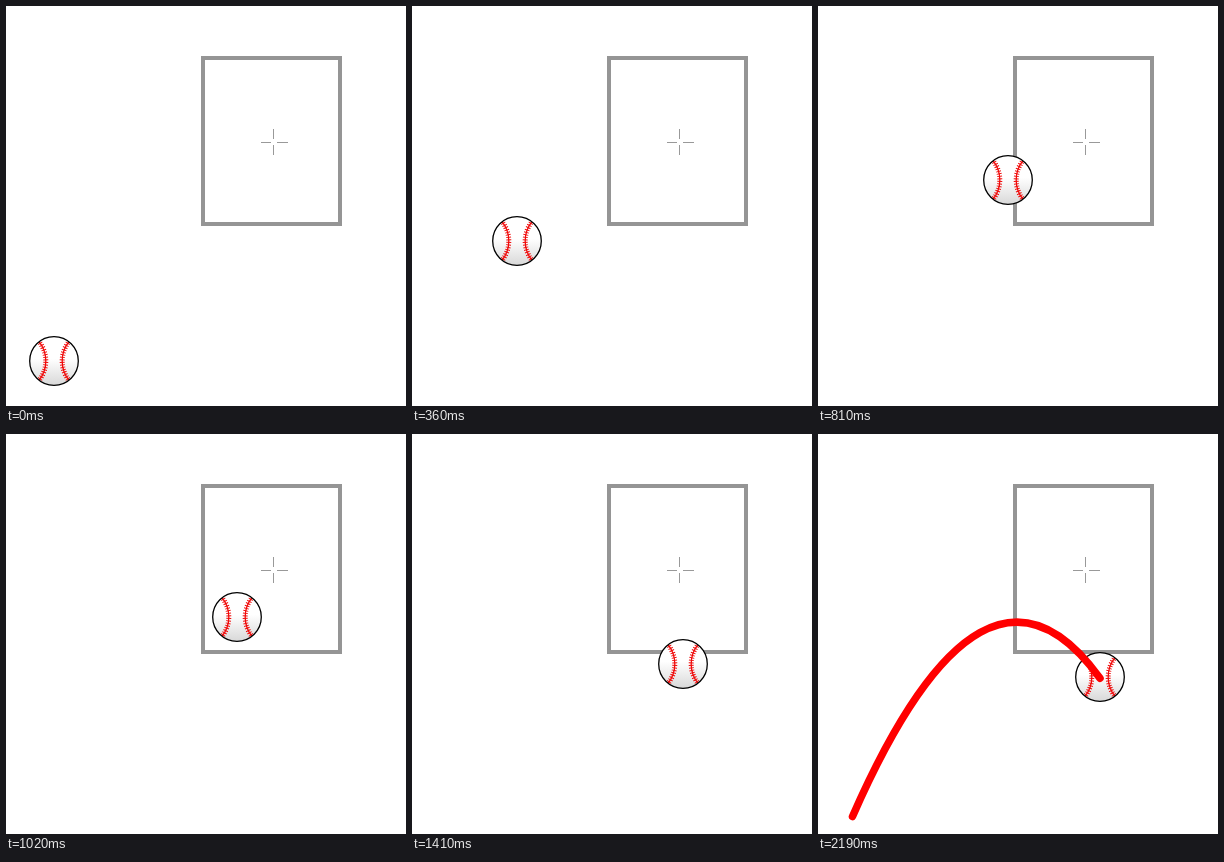
An HTML page for the animation above (2.82 s loop, 400 by 400 pixels).

```html
<!DOCTYPE html>
<html lang="en">
<head>
<meta charset="utf-8">
<title>Curveball</title>
<style>
  html, body { margin: 0; width: 100%; height: 100%; overflow: hidden; background: #fff; }
  svg { display: block; width: 100%; height: 100%; }
  .seam { fill: none; stroke: #f00a0a; }
  .line { stroke-width: 1.3; }
  .stitches { stroke-width: 5; stroke-dasharray: 1 1.5; }
  #trail { fill: none; stroke: #f00; stroke-width: 7.5; stroke-linecap: round; animation: reveal 2820ms step-end infinite; }
</style>
</head>
<body>
<svg viewBox="0 0 400 400">
  <defs>
    <linearGradient id="shade" x1="0" y1="0" x2="0" y2="1">
      <stop offset=".45" stop-color="#fff"/>
      <stop offset="1" stop-color="#d8d8d8"/>
    </linearGradient>
    <clipPath id="inside"><circle r="24"/></clipPath>
    <g id="seam" class="seam">
      <path class="line" d="M-15.5-20A31 31 0 0 1-15.5 20"/>
      <path class="stitches" d="M-15.5-20A31 31 0 0 1-15.5 20"/>
    </g>
  </defs>
  <rect x="197" y="52" width="137" height="166" fill="none" stroke="#959595" stroke-width="4"/>
  <path d="M267.5 123v10M267.5 139v10M255 136.500h10M271 136.500h11" stroke="#999"/>
  <g id="ball" transform="translate(48 355)">
    <circle r="24.300" fill="url(#shade)"/>
    <g clip-path="url(#inside)">
      <use href="#seam"/>
      <use href="#seam" transform="scale(-1 1)"/>
    </g>
    <circle r="24.300" fill="none" stroke="#000" stroke-width="1.300"/>
  </g>
  <path id="trail" d="M34.500 382.500Q165.800 83.800 282 244.300" visibility="hidden"/>
</svg>
<script>
const LOOP = 2820, STEP = 30, TRAIL_AT = 2190;
const ball = document.getElementById('ball');
const trail = document.getElementById('trail');

// Flight waypoints: step, x, y
const points = [
  [0, 48, 355], [12, 105, 235], [18, 138, 199], [19, 144, 195], [27, 190, 174],
  [30, 208, 170], [36, 241, 192], [42, 258, 214], [52, 282, 243]
];
const last = points.length - 1;

const slope = (i, axis) =>
  (points[i + 1][axis] - points[i][axis]) / (points[i + 1][0] - points[i][0]);

function tangent(i, axis) {
  if (i === 0) return 2 * slope(0, axis) - tangent(1, axis);
  if (i === last) return 2 * slope(last - 1, axis) - tangent(last - 1, axis);
  const before = points[i][0] - points[i - 1][0];
  const after = points[i + 1][0] - points[i][0];
  return (slope(i - 1, axis) * after + slope(i, axis) * before) / (before + after);
}

// Cubic Hermite curve through the waypoints
function position(step, axis) {
  const s = Math.min(step, points[last][0]);
  let i = 0;
  while (i < last - 1 && s >= points[i + 1][0]) i++;
  const a = points[i], b = points[i + 1], span = b[0] - a[0];
  const u = (s - a[0]) / span, v = 1 - u;
  return Math.round(
    v * v * (1 + 2 * u) * a[axis] + u * u * (3 - 2 * u) * b[axis] +
    span * u * v * (v * tangent(i, axis) - u * tangent(i + 1, axis)));
}

function draw() {
  const time = performance.now() % LOOP;
  const step = Math.floor(time / STEP);
  ball.setAttribute('transform', `translate(${position(step, 1)} ${position(step, 2)})`);
  trail.setAttribute('visibility', time >= TRAIL_AT ? 'visible' : 'hidden');
  requestAnimationFrame(draw);
}
draw();
</script>
</body>
</html>
```
